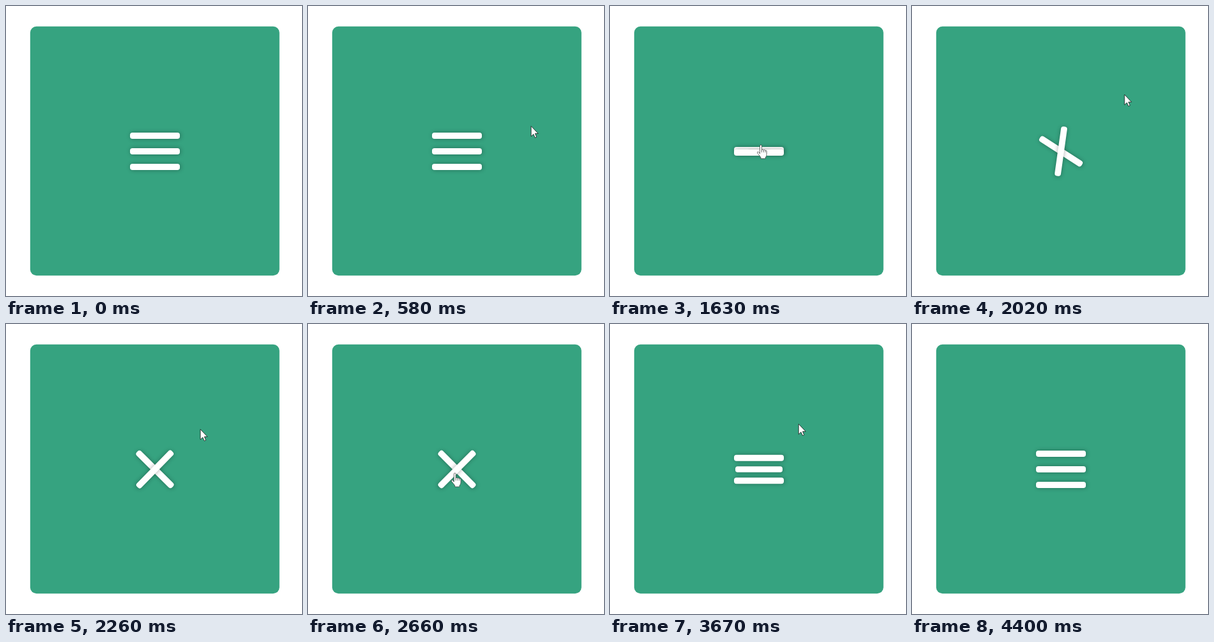
Write an HTML page that moves like this. It is 475x465 px and loops after 6370 ms.

```html
<!DOCTYPE html>
<html lang="en">
<head>
<meta charset="utf-8">
<title>Menu button</title>
<style>
  html, body { margin: 0; width: 100%; height: 100%; overflow: hidden; background: #fff; }
  .bar { position: absolute; left: 199px; top: 227.5px; width: 80px; height: 10px; border-radius: 4px; background: #fff; box-shadow: 1px 0 7px rgba(0, 0, 0, .32); }
  svg { position: absolute; left: 0; top: 0; width: 475px; height: 465px; }
  #cursor path { fill: #fff; stroke: #111; stroke-width: .8; stroke-linejoin: round; }
  #cursor #hand path { stroke: #333; stroke-width: .7; }
</style>
</head>
<body>
<svg viewBox="0 0 475 465"><rect x="38.8" y="32.7" width="400" height="399.6" rx="10" fill="#36a380"/></svg>
<div class="bar" id="top"></div>
<div class="bar" id="middle"></div>
<div class="bar" id="bottom"></div>
<svg viewBox="0 0 475 465">
  <g id="cursor">
    <path id="arrow" d="M0 0V16.5L3.8 13L6.3 18.6L8.8 17.5L6.4 12H11.3Z"/>
    <g id="hand">
      <path d="M-1.5 14V1.5a1.5 1.5 0 0 1 3 0V8q1.5-1.3 3 .3 1.7-1 2.8.6 2-.6 2.2 1.3V15q0 3-2 5v2H0v-2L-5.5 13q-.5-2 1.5-2Z"/>
      <path d="M1.5 8v4M4.5 8.5v3.5M7.3 9v3"/>
    </g>
  </g>
</svg>
<script>
const LOOP = 6370, DURATION = 1000, OPEN_AT = 1305, CLOSE_AT = 2955;
const SHOW_AT = 500, HIDE_AT = 4360;

// Each move carries the pointer from where it rests to a new point.
const ENTRY = { x: 368, y: 190 };
const MOVES = [
  { from: 500, to: 970, x: 242, y: 222.7 },
  { from: 1640, to: 1970, x: 341, y: 142 },
  { from: 2050, to: 2660, x: 235.7, y: 239 },
  { from: 3200, to: 3500, x: 337, y: 178 },
  { from: 3500, to: 3670, x: 302.7, y: 160.3 }
];

const byId = id => document.getElementById(id);
const [topBar, middle, bottom, cursor, arrow, hand] =
  ["top", "middle", "bottom", "cursor", "arrow", "hand"].map(byId);
const clamp = v => Math.min(1, Math.max(0, v));
const smooth = v => v * v * (3 - 2 * v);

// CSS "ease": cubic-bezier(.25, .1, .25, 1)
function ease(x) {
  x = clamp(x);
  if (x === 0 || x === 1) return x;
  const curve = (s, a, b) => 3 * a * s * (1 - s) ** 2 + 3 * b * s * s * (1 - s) + s ** 3;
  let low = 0, high = 1;
  for (let i = 0; i < 24; i++) {
    const mid = (low + high) / 2;
    if (curve(mid, .25, .25) < x) low = mid; else high = mid;
  }
  return curve(low, .1, 1);
}

function pointerAt(t) {
  let { x, y } = ENTRY;
  for (const move of MOVES) {
    const k = smooth(clamp((t - move.from) / (move.to - move.from)));
    x += (move.x - x) * k;
    y += (move.y - y) * k;
  }
  return { x, y };
}

function drawBars(t) {
  const closing = t >= CLOSE_AT;
  const p = clamp((t - (closing ? CLOSE_AT : OPEN_AT)) / DURATION);
  const firstHalf = ease(p * 2), secondHalf = ease(p * 2 - 1);

  // Opening gathers the bars, then turns them; closing does the reverse.
  const spread = 25 * (closing ? secondHalf : 1 - firstHalf);
  const turn = closing ? 1 - firstHalf : secondHalf;
  topBar.style.transform = `translateY(${-spread}px) rotate(${45 * turn}deg)`;
  bottom.style.transform = `translateY(${spread}px) rotate(${135 * turn}deg)`;
  middle.style.transform = `scale(${closing ? ease(p) : 1 - ease(p)})`;
}

function drawCursor(t) {
  const { x, y } = pointerAt(t);
  const overButton = Math.abs(x - 239) < 40 && Math.abs(y - 232.5) < 30;
  cursor.style.display = t >= SHOW_AT && t < HIDE_AT ? "" : "none";
  cursor.setAttribute("transform", `translate(${x} ${y})`);
  arrow.style.display = overButton ? "none" : "";
  hand.style.display = overButton ? "" : "none";
}

const start = performance.now();
function tick() {
  const t = (performance.now() - start) % LOOP;
  drawBars(t);
  drawCursor(t);
  requestAnimationFrame(tick);
}
tick();
</script>
</body>
</html>
```
